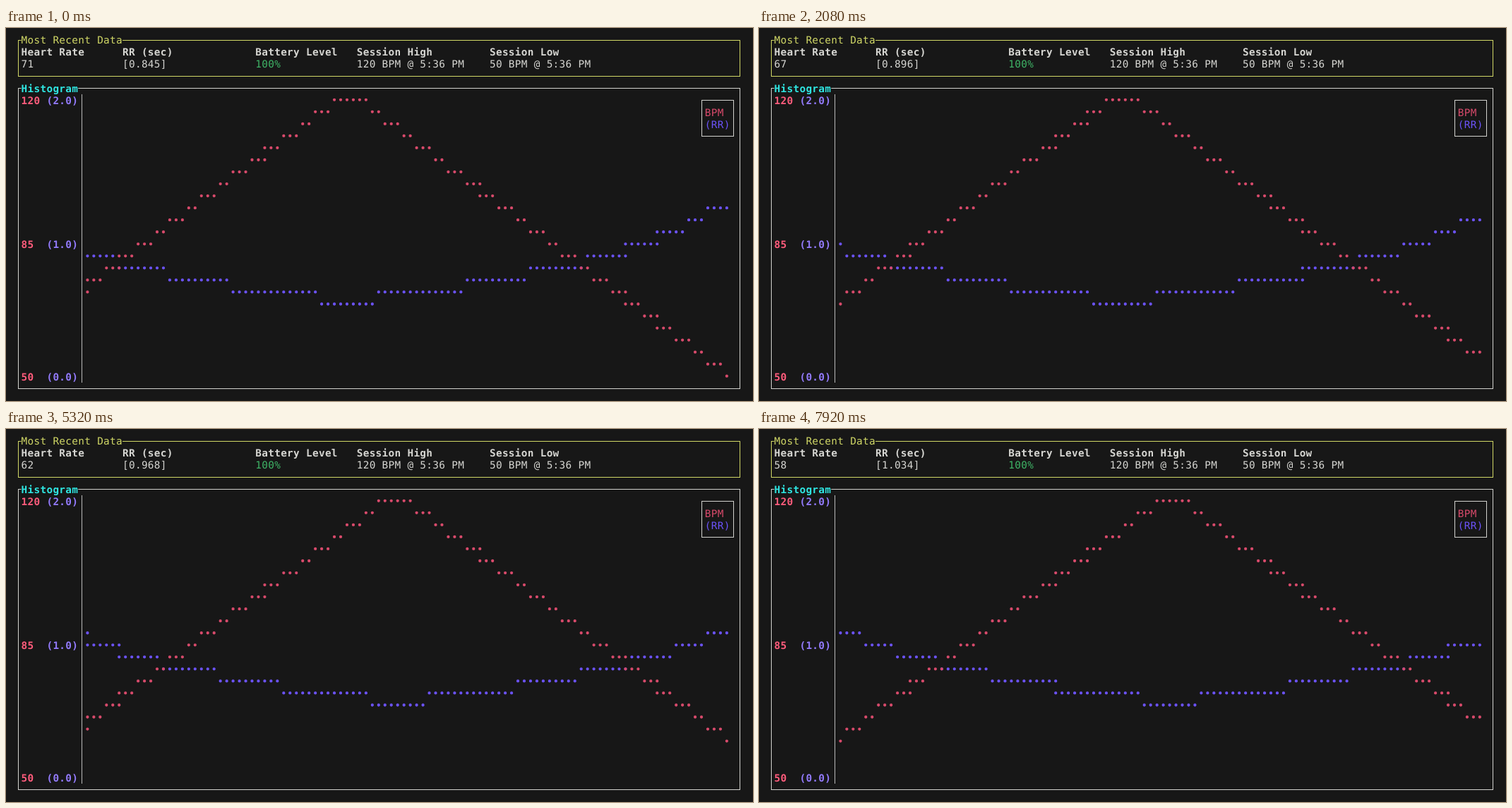
Animation of 1058x529 px, one loop 8000 ms. Source, as an HTML page with a canvas:

```html
<!DOCTYPE html>
<html lang="en">
<head>
<meta charset="utf-8">
<title>Heart rate monitor</title>
<style>
  html, body { margin: 0; width: 100%; height: 100%; overflow: hidden; background: #171717; }
  canvas { display: block; width: 1058px; height: 529px; }
</style>
</head>
<body>
<canvas id="stage" width="1058" height="529"></canvas>
<script>
const ctx = document.getElementById('stage').getContext('2d');

// Terminal cell grid
const CELL_W = 8.965, CELL_H = 17.04, LEFT = 12.6, TOP = 9;
const FONT = '14.35px "DejaVu Sans Mono", monospace';

const LOOP = 8000;
const TICKS = [120, 720, 1400, 2080, 2720, 3320, 4000, 4680, 5320, 6000, 6600, 7280, 7920];
const SAMPLES = 120, COLS = 102, ROWS = 24;
const LOW = 50, HIGH = 120, FIRST = 71;

const C = {
  bg: '#171717', text: '#d6d6d2', line: '#d2d2ce', axis: '#b9b9b9',
  yellow: '#d0d766', cyan: '#2fe6e2', green: '#3fb567',
  red: '#d84a6b', redBold: '#ff5c7c', blue: '#6c53fa', blueBold: '#927afa'
};

const cellX = col => LEFT + col * CELL_W;
const cellY = row => TOP + row * CELL_H;
const lineX = col => Math.floor(17.5 + col * CELL_W) + 0.5;
const lineY = row => Math.floor(17.5 + row * CELL_H) + 0.5;

function print(str, col, row, color = C.text, bold = false) {
  ctx.font = (bold ? 'bold ' : '') + FONT;
  ctx.letterSpacing = '0px';
  ctx.letterSpacing = CELL_W - ctx.measureText('0').width + 'px';
  ctx.fillStyle = color;
  ctx.fillText(str, cellX(col), cellY(row) + 13.4);
}

function box(col0, row0, col1, row1, color) {
  ctx.strokeStyle = color;
  ctx.strokeRect(lineX(col0), lineY(row0), lineX(col1) - lineX(col0), lineY(row1) - lineY(row0));
}

function title(str, row, color, bold) {
  ctx.fillStyle = C.bg;
  ctx.fillRect(cellX(1), cellY(row), str.length * CELL_W, CELL_H);
  print(str, 1, row, color, bold);
}

function plot(rowOf, bpm, color) {
  ctx.fillStyle = color;
  ctx.beginPath();
  for (let i = 0; i < SAMPLES; i++) {
    const x = 115.4 + Math.floor(i * COLS / SAMPLES) * CELL_W;
    const y = 101.8 + Math.floor(rowOf(bpm(i))) * CELL_H;
    ctx.moveTo(x + 2.15, y);
    ctx.arc(x, y, 2.15, 0, Math.PI * 2);
  }
  ctx.fill();
}

function draw(step) {
  const now = FIRST - step;
  // Newest sample sits on the left; the rate climbs to the peak, then falls
  const bpm = i => HIGH - Math.abs(i - (HIGH - now));

  ctx.fillStyle = C.bg;
  ctx.fillRect(0, 0, 1058, 529);

  box(0, 0, 114, 3, C.yellow);
  title('Most Recent Data', 0, C.yellow, false);
  const fields = [
    [1, 'Heart Rate', String(now)],
    [17, 'RR (sec)', `[${(60 / now).toFixed(3)}]`],
    [38, 'Battery Level', '100%', C.green],
    [54, 'Session High', `${HIGH} BPM @ 5:36 PM`],
    [75, 'Session Low', `${LOW} BPM @ 5:36 PM`]
  ];
  for (const [col, name, value, color] of fields) {
    print(name, col, 1, C.text, true);
    print(value, col, 2, color);
  }

  box(0, 4, 114, 29, C.line);
  title('Histogram', 4, C.cyan, true);
  for (const [rate, rr, row] of [['120', '(2.0)', 5], ['85', '(1.0)', 17], ['50', '(0.0)', 28]]) {
    print(rate, 1, row, C.redBold, true);
    print(rr, 5, row, C.blueBold, true);
  }
  ctx.strokeStyle = C.axis;
  ctx.beginPath();
  ctx.moveTo(lineX(10), 94);
  ctx.lineTo(lineX(10), 503);
  ctx.stroke();

  plot(v => ROWS - 1 - 30 * (ROWS - 1) / v, bpm, C.blue);
  plot(v => (HIGH - v) * (ROWS - 1) / (HIGH - LOW), bpm, C.red);

  box(108, 5, 113, 8, C.line);
  print('BPM', 109, 6, C.red);
  print('(RR)', 109, 7, C.blue);
}

ctx.lineWidth = 1;
ctx.textRendering = 'geometricPrecision';
const start = performance.now();
let shown = -1;

function frame() {
  const t = (performance.now() - start) % LOOP;
  const step = TICKS.filter(tick => tick <= t).length;
  if (step !== shown) draw(shown = step);
  requestAnimationFrame(frame);
}
frame();
</script>
</body>
</html>
```
